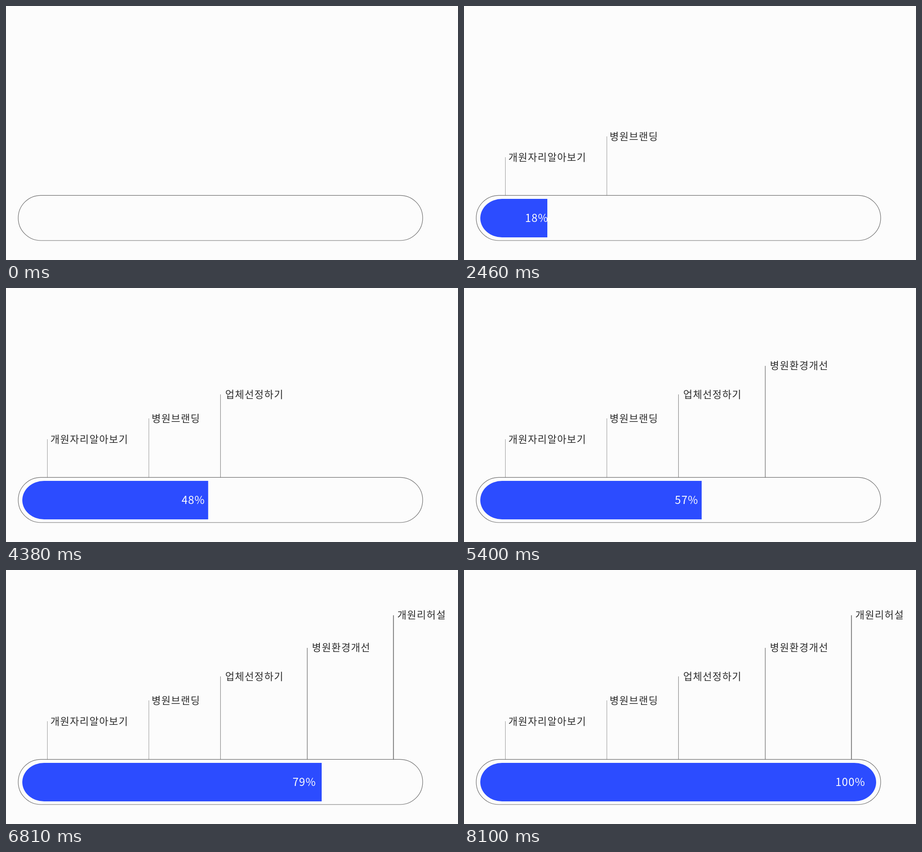
An HTML page that plays this animation: 998 px wide and 561 px high, repeating every 9.51 s.

```html
<!DOCTYPE html>
<html lang="ko">
<head>
<meta charset="utf-8">
<title>Progress</title>
<style>
@property --n { syntax: "<integer>"; inherits: false; initial-value: 0; }

html, body { margin: 0; width: 100%; height: 100%; overflow: hidden; background: #fcfcfc; }
body { position: relative; font-family: "Noto Sans CJK KR", "Noto Sans KR", "Noto Sans CJK JP", sans-serif; }
svg { position: absolute; left: 0; top: 0; }
text { font-size: 22px; font-weight: 300; letter-spacing: 1.3px; fill: #2c2c2c; }
.track { fill: none; stroke: #6e6e6e; stroke-width: 1.2; }

g, .bar, .pct { animation: 9510ms linear infinite both; }
.l1 { animation-name: show1; }
.l2 { animation-name: show2; }
.l3 { animation-name: show3; }
.l4 { animation-name: show4; }
.l5 { animation-name: show5; }

.bar {
  position: absolute; left: 36px; top: 426px; width: 874px; height: 85px;
  border-radius: 48px / 42.5px; background: #2c4cff;
  animation-name: fill;
}
.pct {
  position: absolute; left: 0; top: 447px;
  font-size: 24px; font-weight: 500; line-height: 40px; letter-spacing: 1px;
  white-space: nowrap; color: #fcfcfc;
  counter-reset: n var(--n);
  animation-name: ride, count;
}
.pct::after { content: counter(n) "%"; }

/* labels fade in before the bar moves on */
@keyframes show1 { 0%, .315% { opacity: 0 } 3.155%, 100% { opacity: 1 } }
@keyframes show2 { 0%, 18.927% { opacity: 0 } 22.082%, 100% { opacity: 1 } }
@keyframes show3 { 0%, 37.855% { opacity: 0 } 40.694%, 100% { opacity: 1 } }
@keyframes show4 { 0%, 50.158% { opacity: 0 } 53.628%, 100% { opacity: 1 } }
@keyframes show5 { 0%, 65.3% { opacity: 0 } 67.823%, 100% { opacity: 1 } }

@keyframes fill {
  0%, 3.155% { clip-path: inset(0 874px 0 0) }
  9.464%, 22.082% { clip-path: inset(0 819px 0 0) }
  31.23%, 40.694% { clip-path: inset(0 595px 0 0) }
  47.319%, 54.89% { clip-path: inset(0 433px 0 0) }
  62.461%, 69.716% { clip-path: inset(0 243px 0 0) }
  85.174%, 100% { clip-path: inset(0 0 0 0) }
}
@keyframes ride {
  0%, 22.082% { transform: translateX(48.4px) }
  31.23%, 40.694% { transform: translateX(256.4px) }
  47.319%, 54.89% { transform: translateX(418.3px) }
  62.461%, 69.716% { transform: translateX(606.5px) }
  85.174%, 100% { transform: translateX(820px) }
}
@keyframes count {
  0%, 10.252% { --n: 0 }
  14.984%, 22.082% { --n: 5 }
  31.23%, 40.694% { --n: 37 }
  47.319%, 54.89% { --n: 51 }
  62.461%, 69.716% { --n: 76 }
  85.174%, 100% { --n: 100 }
}
</style>
</head>
<body>
<svg width="998" height="561" viewBox="0 0 998 561">
  <g class="l1">
    <path d="M91.4 334V418" stroke="#8c8c8c" stroke-width=".9"/>
    <text x="98" y="342">개원자리알아보기</text>
  </g>
  <g class="l2">
    <path d="M315.4 288V418" stroke="#8c8c8c" stroke-width=".9"/>
    <text x="321.4" y="296">병원브랜딩</text>
  </g>
  <g class="l3">
    <path d="M473.6 235V418" stroke="#747474" stroke-width="1"/>
    <text x="484" y="243">업체선정하기</text>
  </g>
  <g class="l4">
    <path d="M665.2 172V418" stroke="#686868" stroke-width="1.2"/>
    <text x="675.6" y="179">병원환경개선</text>
  </g>
  <g class="l5">
    <path d="M855.5 100V418" stroke="#5c5c5c" stroke-width="1.5"/>
    <text x="864" y="107">개원리허설</text>
  </g>
  <rect class="track" x="27" y="418.3" width="893" height="99.7" rx="50"/>
</svg>
<div class="bar"></div>
<div class="pct"></div>
</body>
</html>
```
